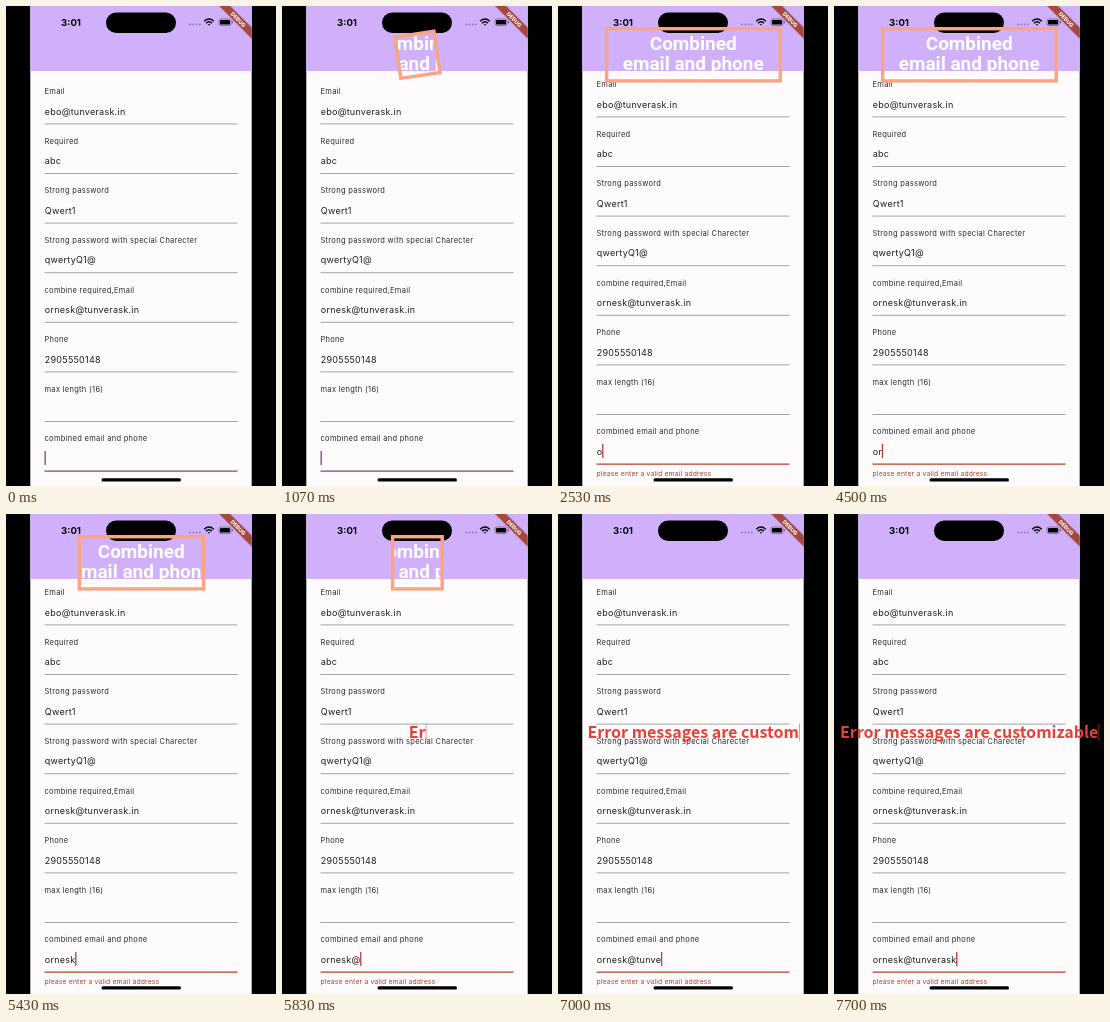
An HTML page for the animation above (8 s loop, 270x480 px).

```html
<!DOCTYPE html>
<html lang="en">
<head>
<meta charset="utf-8">
<title>Form validation demo</title>
<style>
  html, body { margin: 0; width: 100%; height: 100%; overflow: hidden; background: #000; }
  svg { display: block; width: 100vw; height: 100vh; }
  text { font-family: Inter, Roboto, sans-serif; white-space: pre; }
  .label { font-size: 7.5px; letter-spacing: .3px; fill: #2d2a2c; }
  .value { font-size: 9px; letter-spacing: .25px; fill: #1f1d20; }
  .line { stroke: #807b80; stroke-width: .7; }
  .error { font-size: 6.8px; letter-spacing: .17px; fill: #b83f2a; }
  .title { font: bold 19px Roboto, sans-serif; fill: #fff; text-anchor: middle; }
  .message { font: bold 16px "Noto Sans CJK JP", "Noto Sans CJK SC", "Noto Sans", sans-serif; fill: #ea4034; text-anchor: middle; }
</style>
</head>
<body>
<svg viewBox="0 0 270 480">
  <defs>
    <clipPath id="screen"><rect x="24.3" width="221.4" height="480"/></clipPath>
    <clipPath id="page"><rect x="24.3" y="65" width="221.4" height="415"/></clipPath>
    <clipPath id="inner"><rect id="innerRect"/></clipPath>
    <filter id="blur" x="-50%" y="-50%" width="200%" height="200%"><feGaussianBlur stdDeviation="4"/></filter>
  </defs>

  <rect width="270" height="480"/>
  <g clip-path="url(#screen)">
    <rect x="24" width="223" height="480" fill="#fefbfd"/>
    <g clip-path="url(#page)">
      <g id="form">
        <text id="error" class="error" x="38.5" y="476.5">please enter a valid email address</text>
        <rect id="cursor" y="445" width="1.3" height="14"/>
      </g>
    </g>
    <rect x="24" width="223" height="65" fill="#d0b0fa"/>

    <text x="55" y="20" font-size="9.6" font-weight="700">3:01</text>
    <rect x="100" y="6.5" width="70" height="20.5" rx="10.2"/>
    <g fill="#8f78a8">
      <circle cx="184" cy="18.5" r=".9"/><circle cx="187.3" cy="18.5" r=".9"/>
      <circle cx="190.6" cy="18.5" r=".9"/><circle cx="193.9" cy="18.5" r=".9"/>
    </g>
    <g fill="none" stroke="#000" stroke-width="1.5">
      <path d="M198.2 15.2Q203 10.8 207.8 15.2M200 17.2Q203 14.4 206 17.2"/>
      <path d="M201.6 18.3h2.8L203 19.8z" fill="#000" stroke="none"/>
    </g>
    <rect x="213" y="13" width="12" height="6.6" rx="2" fill="none" stroke="#6d5880" stroke-width=".7"/>
    <rect x="214" y="14" width="10" height="4.6" rx="1.2"/>
    <rect x="225.8" y="15" width="1" height="2.6" rx=".5" fill="#6d5880"/>

    <g transform="translate(232.2 13.5) rotate(45)">
      <rect x="-30" y="-4.4" width="60" height="8.8" opacity=".2"/>
      <rect x="-30" y="-3.6" width="60" height="7.2" fill="#a8483c"/>
      <text y="2" font-size="5.4" font-weight="800" text-anchor="middle" fill="#fff">DEBUG</text>
    </g>

    <g id="paste">
      <rect x="28" y="414" width="41" height="26" rx="6" fill="#8f8a4a" opacity=".5" filter="url(#blur)"/>
      <rect x="28" y="412" width="41" height="26" rx="5" fill="#fbf9e6"/>
      <text x="48.6" y="428" font-size="8" text-anchor="middle">Paste</text>
    </g>
    <rect x="95.5" y="472.3" width="79.5" height="3.2" rx="1.6"/>
  </g>

  <g id="title">
    <g clip-path="url(#inner)">
      <text class="title" x="135.2" y="44.4">Combined</text>
      <text class="title" x="135.2" y="63.6">email and phone</text>
    </g>
    <rect id="frame" fill="none" stroke="#fca482"/>
  </g>
  <text id="message" class="message" x="135.2" y="224"></text>
  <rect id="caret" y="209.5" width=".9" height="18" fill="#ea4034" opacity=".6"/>
</svg>

<script>
const LOOP = 8000;
const CENTER = { x: 135.4, y: 48.8 };
const BORDER = 3.4;
const FIRST_KEY = 2390;
const MESSAGE = "Error messages are customizable";
const ADDRESS = "ornesk@tunverask.in";
const TYPED = ADDRESS.slice(0, -3);
const KEYS = [FIRST_KEY, 3090, 4530, 4670, 4770, 4930, 5450, 5990, 6200, 6400,
  6830, 6980, 7100, 7270, 7530, 7670];
// Moments at which the text cursor restarts its blink
const RESETS = [30, 1400, ...KEYS];
const FIELDS = [
  ["Email", "ebo@tunverask.in"],
  ["Required", "abc"],
  ["Strong password", "Qwert1"],
  ["Strong password with special Charecter", "qwertyQ1@"],
  ["combine required,Email", ADDRESS],
  ["Phone", "2905550148"],
  ["max length (16)", ""],
  ["combined email and phone", ""]
];

const el = id => document.getElementById(id);
const set = (node, attrs) => {
  for (const name in attrs) node.setAttribute(name, attrs[name]);
  return node;
};
const add = (tag, attrs, text = "") => {
  const node = set(document.createElementNS("http://www.w3.org/2000/svg", tag), attrs);
  node.textContent = text;
  return el("form").insertBefore(node, el("error"));
};
const ramp = (t, from, to) => Math.min(1, Math.max(0, (t - from) / (to - from)));
const ease = p => p < .5 ? 2 * p * p : 1 - 2 * (1 - p) ** 2;
const move = (t, from, to) => ease(ramp(t, from, to));

let input, underline;
FIELDS.forEach(([label, value], i) => {
  const y = 85.5 + i * 49.6;
  add("text", { class: "label", x: 38.5, y: y + 2.7 }, label);
  input = add("text", { class: "value", x: 38.8, y: y + 23 }, value);
  underline = add("line", { class: "line", x1: 38.5, x2: 231.5, y1: y + 32.4, y2: y + 32.4 });
});
underline.style.strokeWidth = 1.3;

function drawForm(t) {
  const failed = t >= FIRST_KEY;
  const shift = move(t, FIRST_KEY, 2530);
  const color = failed ? "#b83f2a" : "#7b4488";
  set(el("form"), { transform: `translate(0 ${-7 * shift})` });
  set(el("error"), { opacity: shift });
  underline.style.stroke = color;

  const count = KEYS.filter(k => k <= t).length;
  input.textContent = TYPED.slice(0, count);
  const width = count ? input.getComputedTextLength() : 0;
  const since = (t - Math.max(0, ...RESETS.filter(k => k <= t))) % 1000;
  const blink = 1 - ramp(since, 500, 630) + ramp(since, 870, 970);
  set(el("cursor"), { x: 38.5 + width, fill: color, opacity: blink });
  set(el("paste"), { opacity: ramp(t, 1400, 1520) - ramp(t, FIRST_KEY, 2490) });
}

// A rectangle around the title's centre, shrunk on all sides by inset
function centered(node, width, height, inset, angle) {
  const w = Math.max(0, width - 2 * inset);
  const h = Math.max(0, height - 2 * inset);
  set(node, {
    x: CENTER.x - w / 2, y: CENTER.y - h / 2, width: w, height: h,
    transform: `rotate(${angle} ${CENTER.x} ${CENTER.y})`
  });
}

function drawTitle(t) {
  const scale = move(t, 530, 1310) - move(t, 5860, 6800);
  const width = scale * (53 + 124 * (move(t, 1290, 1990) - move(t, 5110, 5830)));
  const height = scale * 55.6;
  const angle = -45 * (1 - scale);
  const border = Math.min(BORDER, width / 2.5);
  centered(el("frame"), width, height, border / 2, angle);
  centered(el("innerRect"), width, height, border, angle);
  set(el("frame"), { "stroke-width": border });
  set(el("title"), { visibility: scale > .005 ? "visible" : "hidden" });
}

function drawMessage(t) {
  const start = 5720;
  const text = el("message");
  const count = Math.max(0, Math.floor((t - start) / 49.4));
  text.textContent = MESSAGE.slice(0, count);
  const width = count ? text.getComputedTextLength() : 0;
  const lit = t >= 7530 || (t >= start && (t - start) % 900 < 450);
  set(el("caret"), { x: 135.2 + width / 2, visibility: lit ? "visible" : "hidden" });
}

function draw() {
  const t = performance.now() % LOOP;
  drawForm(t);
  drawTitle(t);
  drawMessage(t);
  requestAnimationFrame(draw);
}
draw();
</script>
</body>
</html>
```
